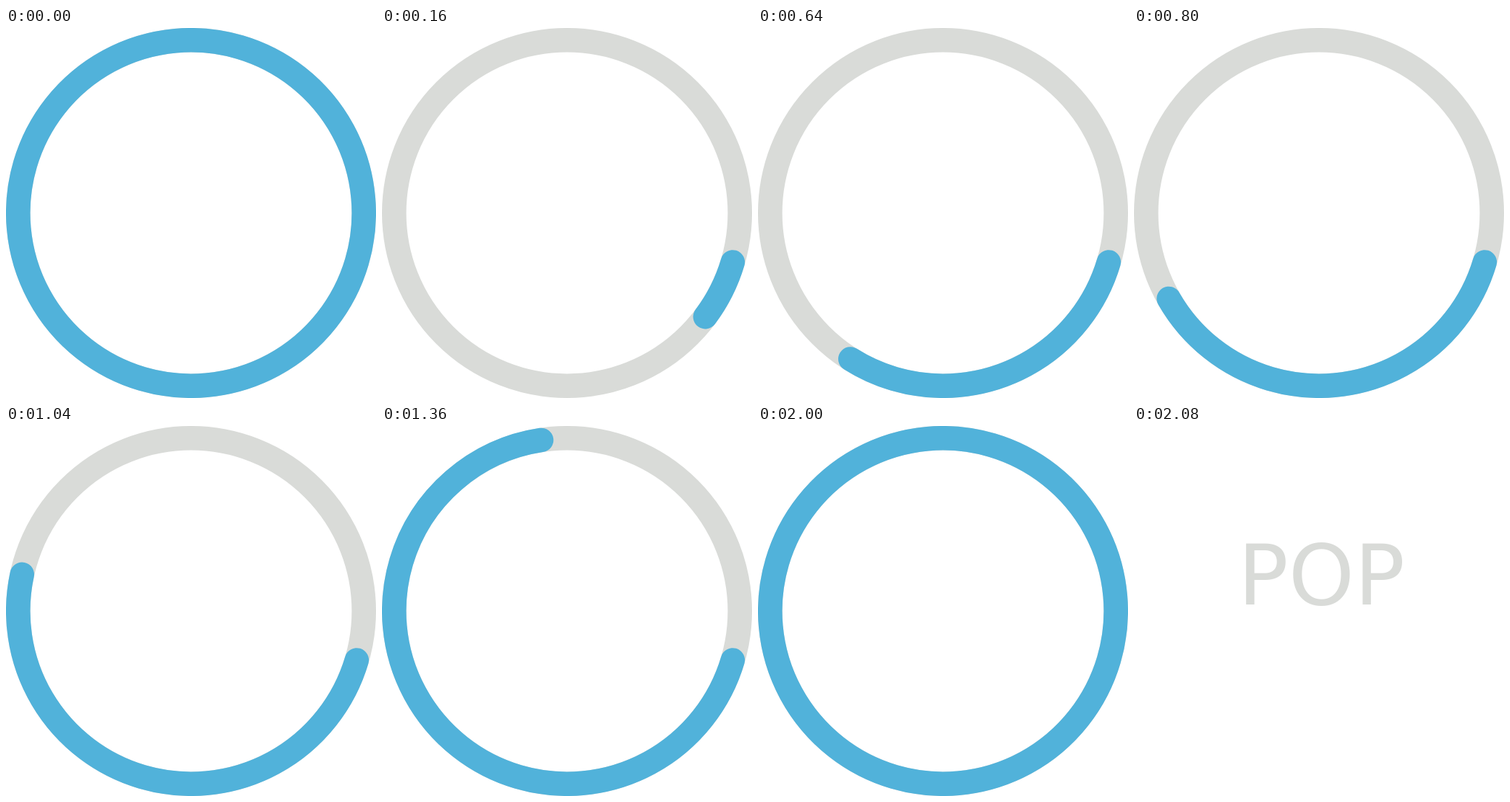
An HTML page without scripts for the animation above (2.18 s loop, 512 by 512 pixels).

```html
<!DOCTYPE html>
<html lang="en">
<head>
<meta charset="utf-8">
<title>Ring and pop</title>
<style>
  html, body { margin: 0; width: 100%; height: 100%; overflow: hidden; background: #fff; }
  svg { display: block; width: 100%; height: 100%; }

  .ring circle { fill: none; stroke-width: 33.6; }
  .track { stroke: #d9dbd8; }
  .bar {
    stroke: #51b2da;
    stroke-linecap: round;
    stroke-dasharray: 360 400;
    animation: fill 2180ms infinite;
  }
  .ring { animation: hide 2180ms step-end infinite; }
  .word {
    fill: #d9dbd8;
    font: 116px "DejaVu Sans", sans-serif;
    animation: show 2180ms step-end infinite;
  }

  /* dash offset = degrees still empty; one step every 80ms */
  @keyframes fill {
    0%     { stroke-dashoffset: 0;     animation-timing-function: step-end; }
    3.65%  { stroke-dashoffset: 353.5; animation-timing-function: steps(4, end); }
    18.33% { stroke-dashoffset: 297.9; animation-timing-function: steps(3, end); }
    29.34% { stroke-dashoffset: 254.1; animation-timing-function: steps(5, end); }
    47.69% { stroke-dashoffset: 184.3; animation-timing-function: step-end; }
    51.36% { stroke-dashoffset: 155.8; animation-timing-function: steps(6, end); }
    73.37% { stroke-dashoffset: 74.3;  animation-timing-function: steps(5, end); }
    91.72%, 100% { stroke-dashoffset: 0; }
  }
  @keyframes hide {
    0% { visibility: visible; }
    95.4%, 100% { visibility: hidden; }
  }
  @keyframes show {
    0% { visibility: hidden; }
    95.4%, 100% { visibility: visible; }
  }
</style>
</head>
<body>
<svg viewBox="0 0 512 512">
  <g class="ring">
    <circle class="track" cx="256" cy="256" r="239.2"/>
    <circle class="bar" cx="256" cy="256" r="239.2" pathLength="360" transform="rotate(16.5 256 256)"/>
  </g>
  <text class="word" x="143.8" y="247">POP</text>
</svg>
</body>
</html>
```
